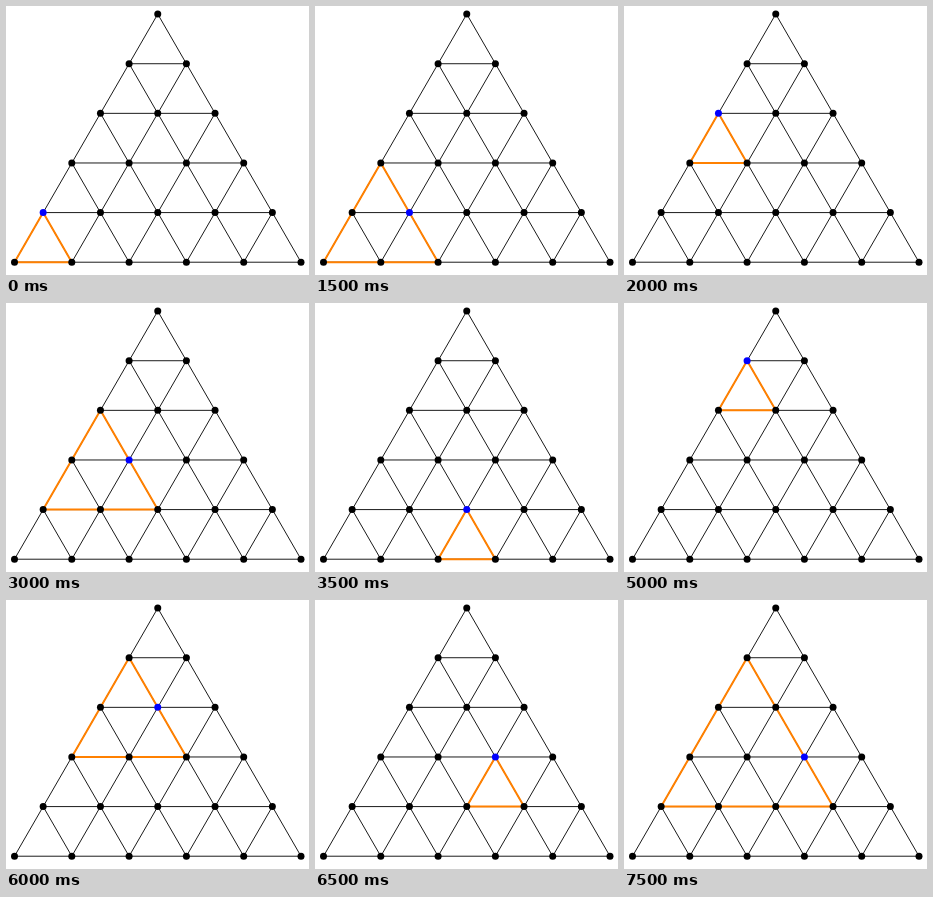
These frames come from a looping animation (303 by 269 pixels, 8 s). An HTML page with a canvas:

```html
<!DOCTYPE html>
<html>
<head>
<meta charset="utf-8">
<style>
html, body { margin: 0; width: 100%; height: 100%; overflow: hidden; background: #fff; }
canvas { display: block; }
</style>
</head>
<body>
<canvas id="stage" width="303" height="269"></canvas>
<script>
const ctx = document.getElementById('stage').getContext('2d');
const ROWS = 5, SIDE = 57.3, HEIGHT = SIDE * Math.sqrt(3) / 2;
const STEP = 500, STEPS = 16;

// Lattice point: row from the top, column from the left
const point = (row, col) => [151.75 + SIDE * (col - row / 2), 8.1 + HEIGHT * row];

// Walk each diagonal of marked points; grow triangles upwards from each one
const steps = [];
for (let start = ROWS - 1; start >= 1; start--)
  for (let col = 0; start + col < ROWS; col++)
    for (let up = 0; up <= col; up++)
      steps.push({ row: start + col, col, up });

function triangle(row, col, size) {
  ctx.beginPath();
  ctx.moveTo(...point(row, col));
  ctx.lineTo(...point(row + size, col));
  ctx.lineTo(...point(row + size, col + size));
  ctx.closePath();
  ctx.stroke();
}

function dot(row, col, color) {
  ctx.fillStyle = color;
  ctx.beginPath();
  ctx.arc(...point(row, col), 3.5, 0, 2 * Math.PI);
  ctx.fill();
}

function eachPoint(rows, draw) {
  for (let row = 0; row < rows; row++)
    for (let col = 0; col <= row; col++) draw(row, col);
}

function draw({ row, col, up }) {
  ctx.fillStyle = '#fff';
  ctx.fillRect(0, 0, 303, 269);
  ctx.strokeStyle = '#000';
  ctx.lineWidth = 0.9;
  eachPoint(ROWS, (r, c) => triangle(r, c, 1));
  ctx.strokeStyle = '#ff8000';
  ctx.lineWidth = 2;
  triangle(row - up, col - up, up + 1);
  eachPoint(ROWS + 1, (r, c) => dot(r, c, r === row && c === col ? '#00f' : '#000'));
}

function frame() {
  draw(steps[Math.floor(performance.now() / STEP) % STEPS]);
  requestAnimationFrame(frame);
}
frame();
</script>
</body>
</html>
```
